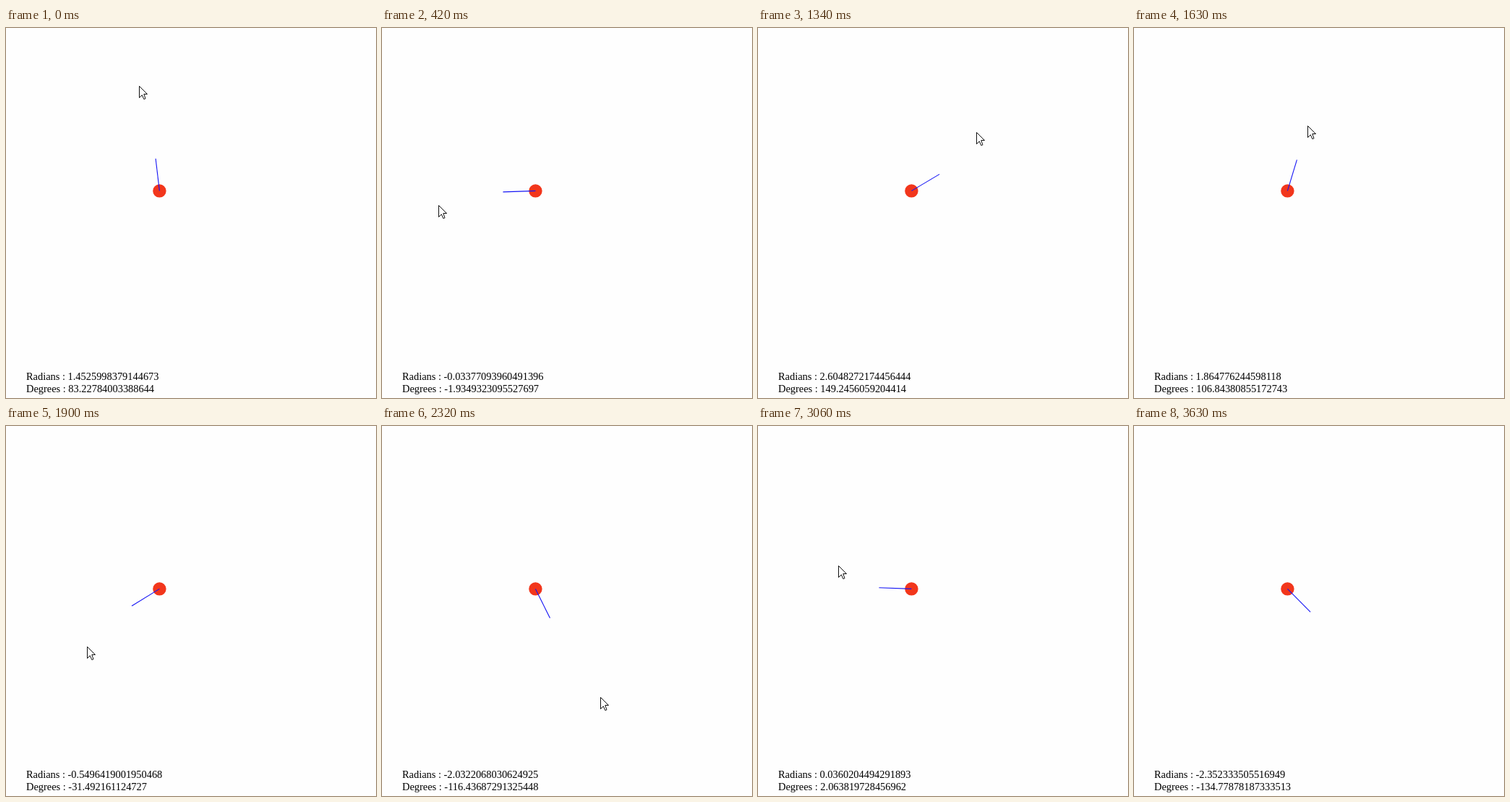
Animation of 512x512 px, one loop 4 s. Source, as an HTML page with a canvas:

```html
<!DOCTYPE html>
<html>
<head>
<meta charset="utf-8">
<style>
html, body { margin: 0; width: 512px; height: 512px; overflow: hidden; background: #fefefe; }
canvas { display: block; }
</style>
</head>
<body>
<canvas id="stage" width="512" height="512"></canvas>
<script>
const ctx = document.getElementById('stage').getContext('2d');
const LOOP = 4000, STEP = 54, LAG = 30, POINTER_GONE = 3630;
const SCALE = 0.9, CX = 212.4, CY = 225.4, LINE = 50 * SCALE;
const arrow = new Path2D('M.5 .5V16.5L4.3 12.8L6.8 18.5L9 17.7L6.8 11.5H11.5Z');

// Key points of the pointer: time, then offset from the ball in page pixels
const path = [
  [0, -19, -160], [150, -80, -158], [400, -148, 5], [650, -118, 122], [890, -18, 182],
  [1230, 133, 20], [1340, 121, -72], [1450, 30, -118], [1660, 26, -92], [1900, -111, 68],
  [2100, -40, 185], [2320, 89, 179], [2540, 132, 50], [2700, 108, 130], [2960, -85, 105],
  [3060, -111, -4], [3150, -98, -90], [3240, 10, -106], [3450, 200, 115], [3570, 258, 260]
];
const lastKey = path.length - 1;

function segmentAt(t) {
  const next = path.findIndex(p => p[0] > t);
  return next < 0 ? lastKey - 1 : next - 1;
}

// The picture advances in equal steps between key points
function stepTime(t) {
  if (t >= path[lastKey][0]) return path[lastKey][0];
  const i = segmentAt(t), from = path[i][0], span = path[i + 1][0] - from;
  const step = span / Math.round(span / STEP);
  return from + Math.floor((t - from) / step) * step;
}

function slope(i, axis) {
  const a = path[Math.max(i - 1, 0)], b = path[Math.min(i + 1, lastKey)];
  return (b[axis] - a[axis]) / (b[0] - a[0]);
}

// Cubic Hermite curve through the key points, in whole pixels
function pointerAt(t) {
  const i = segmentAt(t), a = path[i], b = path[i + 1], span = b[0] - a[0];
  const u = (t - a[0]) / span, v = 1 - u;
  return [1, 2].map(k => Math.round(
    a[k] * v * v * (1 + 2 * u) + b[k] * u * u * (1 + 2 * v) +
    span * u * v * (v * slope(i, k) - u * slope(i + 1, k))));
}

function drawPointer([x, y]) {
  ctx.save();
  ctx.translate(Math.round(CX + x * SCALE), Math.round(CY + y * SCALE));
  ctx.fillStyle = '#fff';
  ctx.strokeStyle = '#111';
  ctx.lineWidth = 1;
  ctx.fill(arrow);
  ctx.stroke(arrow);
  ctx.restore();
}

function draw(now) {
  const t = stepTime(now);
  const [x, y] = pointerAt(t);
  const radians = Math.atan2(-y, -x);

  ctx.fillStyle = '#fefefe';
  ctx.fillRect(0, 0, 512, 512);

  ctx.fillStyle = '#f2361c';
  ctx.beginPath();
  ctx.arc(CX, CY, 9.2, 0, 2 * Math.PI);
  ctx.fill();

  ctx.strokeStyle = '#1414f5';
  ctx.lineWidth = 1.1;
  ctx.beginPath();
  ctx.moveTo(CX, CY);
  ctx.lineTo(CX - LINE * Math.cos(radians), CY - LINE * Math.sin(radians));
  ctx.stroke();

  ctx.fillStyle = '#000';
  ctx.font = '14.4px "Liberation Serif", serif';
  ctx.fillText('Radians : ' + radians, 28, 487);
  ctx.fillText('Degrees : ' + radians * (180 / Math.PI), 28, 504);

  // The readings trail the pointer slightly
  if (now < POINTER_GONE) drawPointer(pointerAt(t + LAG));
}

const start = performance.now();
function tick() {
  draw((performance.now() - start) % LOOP);
  requestAnimationFrame(tick);
}
tick();
</script>
</body>
</html>
```
